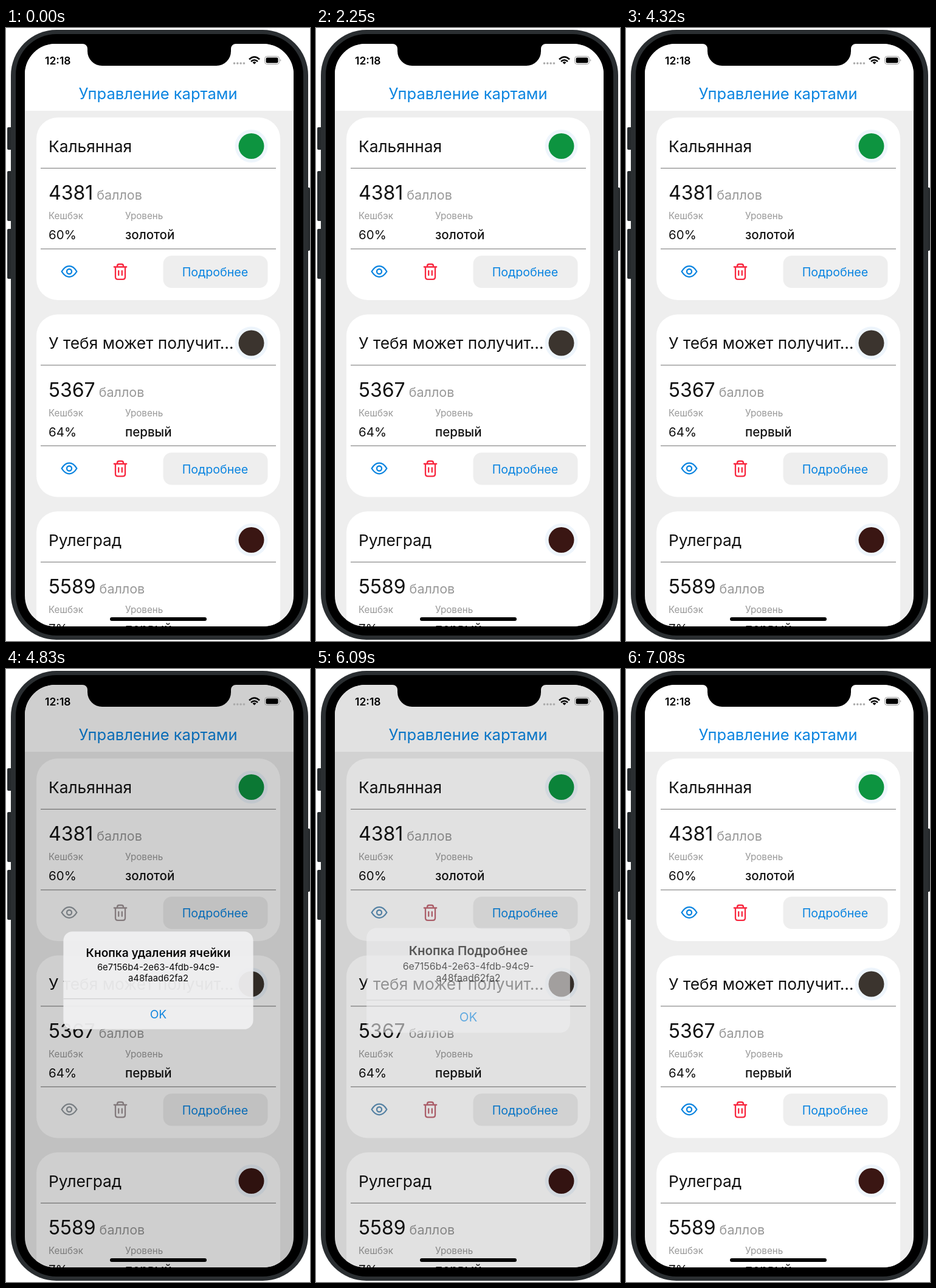
These frames come from a looping animation (500x1007 px, 7.11 s). An HTML page:

```html
<!DOCTYPE html>
<html lang="ru">
<head>
<meta charset="utf-8">
<style>
html, body { margin: 0; width: 100%; height: 100%; overflow: hidden; background: #fff; }
svg { display: block; width: 500px; height: 1007px; font-family: Inter, "Noto Sans", sans-serif; font-optical-sizing: none; }
.mid { text-anchor: middle; }
.blue { fill: #0a84e0; }
.soft { fill: #989898; }
.icon { fill: none; stroke-width: 2.3; stroke-linecap: round; stroke-linejoin: round; }
.eye { stroke: color-mix(in srgb, #9c9c9e calc(var(--q) * 100%), #0a84e0); }
.bin { stroke: color-mix(in srgb, #9c9c9e calc(var(--q) * 100%), #f8273f); }
</style>
</head>
<body>
<svg id="stage" viewBox="0 0 500 1007" style="--q:0">
  <defs>
    <clipPath id="screen"><rect x="31" y="26" width="442" height="957" rx="50"/></clipPath>
    <g id="eye" class="icon eye">
      <path d="M-12.4 0Q-7-8.800 0-8.800T12.400 0Q7 8.800 0 8.800T-12.400 0Z"/>
      <circle r="4"/>
    </g>
    <g id="bin" class="icon bin">
      <path d="M-10.200-8H10.200M-8-8V8.500Q-8 12.300-4 12.300H4Q8 12.300 8 8.500V-8M-5-8V-9.500Q-5-12.500-2-12.500H2Q5-12.500 5-9.500V-8M-2.800-1.500V5.500M2.800-1.500V5.500"/>
    </g>
  </defs>

  <!-- phone body and side buttons -->
  <g fill="#24282b">
    <rect x="2" y="163" width="10" height="37" rx="2"/>
    <rect x="2" y="235" width="10" height="82" rx="2"/>
    <rect x="2" y="330" width="10" height="82" rx="2"/>
    <rect x="490" y="262" width="10" height="104" rx="2"/>
  </g>
  <rect x="8" y="3" width="489" height="1002" rx="75" fill="#2a2e31"/>
  <rect x="16" y="10" width="473" height="988" rx="67"/>

  <g clip-path="url(#screen)">
    <path d="M31 26H473V983H31Z" fill="#eee"/>
    <path d="M31 26H473V136H31Z" fill="#fff"/>
    <text class="mid blue" x="250" y="117" font-size="25.5">Управление картами</text>
    <g id="cards"></g>
    <rect id="dim" x="31" y="26" width="442" height="957"/>
  </g>

  <!-- notch, status bar, home indicator -->
  <path d="M126 24V26A8 8 0 0 1 134 34V38A24 24 0 0 0 158 62H346A24 24 0 0 0 370 38V34A8 8 0 0 1 378 26V24Z"/>
  <text x="64" y="60" font-size="17.5" font-weight="600">12:18</text>
  <path d="M375.500 58H394" stroke="#aaa" stroke-width="3.600" stroke-linecap="round" stroke-dasharray="0 5.300"/>
  <g fill="none" stroke="#000" stroke-width="2.600">
    <path d="M400 51.500Q408.500 43.500 417 51.500M403 55Q408.500 50 414 55"/>
    <path d="M405.500 56.500Q408.500 54 411.500 56.500L408.500 59.500Z" fill="#000" stroke="none"/>
  </g>
  <rect x="425.500" y="46.500" width="24" height="13" rx="4" fill="none" stroke="#999"/>
  <rect x="427.500" y="48.500" width="20" height="9" rx="2.200"/>
  <path d="M451 51Q453.500 53 451 55Z" fill="#999"/>
  <rect x="171" y="968" width="159" height="6" rx="3"/>

  <g id="alert">
    <rect id="panel" x="96" width="309" rx="15" fill="#f0f0f1"/>
    <path id="rule" stroke="#c8c8ca"/>
    <text id="title" class="mid" x="250.500" font-size="18.9" font-weight="600"></text>
    <g class="mid" font-size="14.7">
      <text id="line1" x="250.500" y="495"></text>
      <text id="line2" x="250.500" y="513"></text>
    </g>
    <text id="ok" class="mid blue" x="250.500" font-size="19">OK</text>
  </g>
</svg>
<script>
const LOOP = 7110, MID = 511.5;
const $ = id => document.getElementById(id);

const cards = [
  ['Кальянная', 4381, '60%', 'золотой', '#0d9440'],
  ['У тебя может получит…', 5367, '64%', 'первый', '#3b342e'],
  ['Рулеград', 5589, '7%', 'первый', '#3a1613'],
];

$('cards').innerHTML = cards.map(([name, points, cashback, level, color], i) => `
  <g transform="translate(0 ${i * 323.5})">
    <rect x="50" y="147" width="401" height="300" rx="35" fill="#fff"/>
    <circle cx="403.500" cy="194" r="27" fill="#eef5fc"/>
    <circle cx="403.500" cy="194" r="21" fill="${color}"/>
    <text x="70" y="203.500" font-size="26.3" fill="#111">${name}</text>
    <path d="M57 230.300H444M57 362.800H444" stroke="#8c8c8c" stroke-width="1.200"/>
    <text x="70" y="282" font-size="32" fill="#111">${points}<tspan class="soft" dx="6" font-size="21.5">баллов</tspan></text>
    <g class="soft" font-size="15.2">
      <text x="70" y="314">Кешбэк</text>
      <text x="196" y="314">Уровень</text>
    </g>
    <g font-size="20.5" fill="#111">
      <text x="70" y="347">${cashback}</text>
      <text x="196" y="347" font-weight="500">${level}</text>
    </g>
    <use href="#eye" x="104" y="400"/>
    <use href="#bin" x="188" y="400.500"/>
    <rect x="258.500" y="374" width="172" height="53" rx="14" fill="#eee"/>
    <text class="mid blue" x="344" y="408" font-size="19.7">Подробнее</text>
  </g>`).join('');

const id = ['6e7156b4-2e63-4fdb-94c9-', 'a48faad62fa2'];
const alerts = [
  { title: 'Кнопка управления', lines: ['', ''], open: 995, close: 1895 },
  { title: 'Кнопка просмотра', lines: id, open: 2585, close: 3305 },
  { title: 'Кнопка удаления ячейки', lines: id, open: 4625, close: 5345 },
  { title: 'Кнопка Подробнее', lines: id, open: 6005, close: 6725 },
];

// Critically damped spring from 1 to 0
function spring(ms) {
  const x = Math.max(0, ms) * 0.02285;
  return (1 + x) * Math.exp(-x);
}

function fill(alert) {
  const half = alert.lines[0] ? 79.5 : 61.5;
  const top = MID - half, bottom = MID + half;
  $('panel').setAttribute('y', top);
  $('panel').setAttribute('height', half * 2);
  $('rule').setAttribute('d', `M96 ${bottom - 49.5}H405`);
  $('title').setAttribute('y', top + 41);
  $('ok').setAttribute('y', bottom - 17.5);
  $('title').textContent = alert.title;
  $('line1').textContent = alert.lines[0];
  $('line2').textContent = alert.lines[1];
}

let shown;
function draw(now) {
  const t = now % LOOP;
  const alert = alerts.findLast(a => a.open <= t) || alerts[0];
  if (alert !== shown) fill(shown = alert);
  const closing = t >= alert.close;
  const rest = spring(t - (closing ? alert.close : alert.open));
  let q = closing ? rest : 1 - rest;
  if (q < 0.004) q = 0;
  const scale = closing ? 1 : 1 + 0.2 * rest;
  $('stage').style.setProperty('--q', q);
  $('dim').setAttribute('opacity', 0.2 * q);
  $('alert').setAttribute('opacity', q);
  $('alert').setAttribute('transform', `translate(250.5 ${MID}) scale(${scale}) translate(-250.5 ${-MID})`);
}

const start = performance.now();
function tick() {
  draw(performance.now() - start);
  requestAnimationFrame(tick);
}
tick();
</script>
</body>
</html>
```
